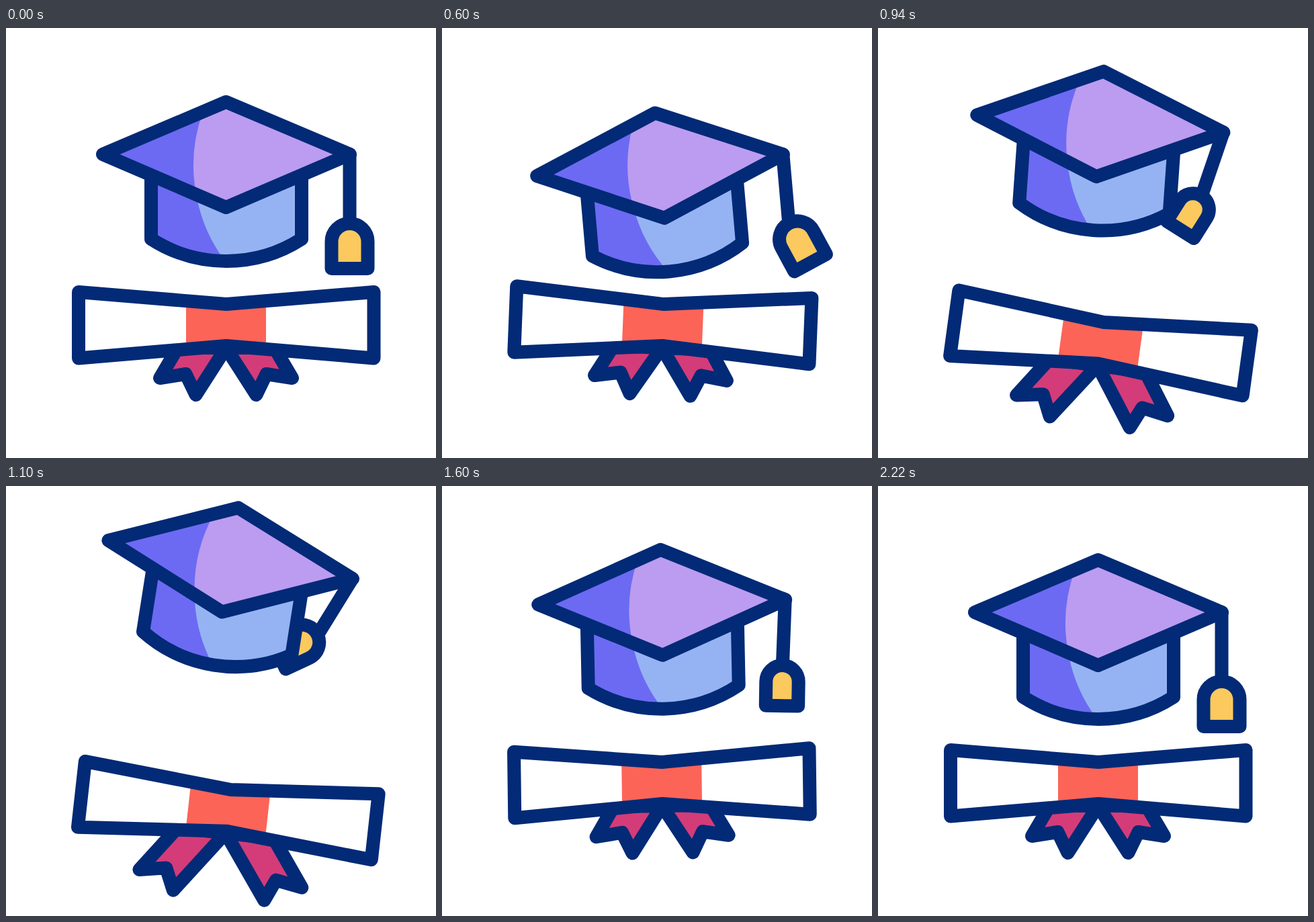
These frames come from a looping animation (640x640 px, 2400 ms). An HTML page without scripts:

```html
<!DOCTYPE html>
<html lang="en">
<head>
<meta charset="utf-8">
<title>Graduation cap and diploma</title>
<style>
  html, body { margin: 0; width: 100%; height: 100%; overflow: hidden; background: #fff; }
  svg { display: block; width: 100%; height: 100%; }

  .line { stroke: #032a76; stroke-width: 20; stroke-linejoin: round; stroke-linecap: round; fill: none; }
  .dark { fill: #6c6af3; }
  .lilac { fill: #bb9cf0; }
  .sky { fill: #95b3f3; }
  .gold { fill: #fbc95d; }
  .red { fill: #fc6458; }
  .pink { fill: #d33c79; }
  .paper { fill: #fff; }

  .cap, .string, .tag, .scroll, .ribbon {
    animation-duration: 2.4s;
    animation-iteration-count: infinite;
    animation-timing-function: cubic-bezier(.333, 0, .667, 1);
  }
  .cap { transform-origin: 327.5px 228px; animation-name: cap-jump, cap-tilt; }
  .string { transform-origin: 511.5px 188px; animation-name: string-swing; }
  .tag { transform-origin: 511.5px 291px; animation-name: tag-swing, tag-pull, tag-squash; }
  .scroll { transform-origin: 327.5px 470px; animation-name: scroll-drop, scroll-rock; }
  .ribbon { d: path("M0 6L-72 6L-98.5 51L-60 45L-45 76Z"); animation-name: ribbon-stretch; }

  @keyframes cap-jump {
    0%, 8.333%, 91.667%, 100% { translate: 0 0; }
    25% { translate: 0 16px; }
    50% { translate: 0 -86.5px; }
    75% { translate: 0 9.5px; }
  }
  @keyframes cap-tilt {
    0%, 8.333%, 91.667%, 100% { rotate: 0deg; }
    25%, 75% { rotate: -5deg; }
    50% { rotate: 10deg; }
  }
  @keyframes string-swing {
    0%, 25%, 91.667%, 100% { rotate: 0deg; }
    50% { rotate: 24.6deg; }
    75% { rotate: -4deg; }
  }
  @keyframes tag-swing {
    0%, 8.333%, 91.667%, 100% { rotate: 0deg; }
    25% { rotate: -23.4deg; }
    50% { rotate: 37.7deg; }
    75% { rotate: -14.8deg; }
  }
  @keyframes tag-pull {
    0%, 25%, 91.667%, 100% { translate: 0 0; }
    50%, 75% { translate: 0 -5px; }
  }
  /* The stroke keeps its weight while the tag shrinks. */
  @keyframes tag-squash {
    0%, 25%, 75%, 100% { d: path("M484.5 358L484.5 318C484.5 303 496.5 291 511.5 291C526.5 291 538.5 303 538.5 318L538.5 358Z"); }
    37.5% { d: path("M488.3 348.6L488.3 314.2C488.3 301.3 498.6 291 511.5 291C524.4 291 534.7 301.3 534.7 314.2L534.7 348.6Z"); animation-timing-function: ease-out; }
    50% { d: path("M485 356.7L485 317.5C485 302.8 496.8 291 511.5 291C526.2 291 538 302.8 538 317.5L538 356.7Z"); animation-timing-function: ease-in; }
    62.5% { d: path("M488.3 348.6L488.3 314.2C488.3 301.3 498.6 291 511.5 291C524.4 291 534.7 301.3 534.7 314.2L534.7 348.6Z"); }
  }
  @keyframes scroll-drop {
    0%, 25%, 66.667%, 100% { translate: 0 0; }
    50% { translate: 0 43.8px; }
  }
  @keyframes scroll-rock {
    0%, 8.333%, 91.667%, 100% { rotate: 0deg; }
    25% { rotate: 2.3deg; }
    41.667% { rotate: 8.1deg; }
    58.333% { rotate: -3deg; }
    75% { rotate: 1.5deg; }
  }
  @keyframes ribbon-stretch {
    0%, 25%, 66.667%, 100% { d: path("M0 6L-72 6L-98.5 51L-60 45L-45 76Z"); }
    50% { d: path("M0 6L-72 6L-123.5 76L-84 69L-70 101Z"); }
  }
</style>
</head>
<body>
<svg viewBox="0 0 640 640">
  <g class="scroll">
    <g transform="translate(327.5 470)">
      <path class="line pink ribbon" d="M0 6L-72 6L-98.5 51L-60 45L-45 76Z"/>
      <g transform="scale(-1 1)">
        <path class="line pink ribbon" d="M0 6L-72 6L-98.5 51L-60 45L-45 76Z"/>
      </g>
    </g>
    <path class="paper" d="M108 393L328 411 547.5 393V491.5L328 473 108 491.5Z"/>
    <path class="red" d="M268 408H387V476H268Z"/>
    <path class="line" d="M108 393L328 411 547.5 393V491.5L328 473 108 491.5Z"/>
  </g>

  <g class="cap">
    <g class="string">
      <path class="line" d="M511.5 188V288"/>
      <path class="line gold tag" d="M484.5 358L484.5 318C484.5 303 496.5 291 511.5 291C526.5 291 538.5 303 538.5 318L538.5 358Z"/>
    </g>
    <path class="dark" d="M216 220V314A207 207 0 0 0 440 314V220Z"/>
    <path class="sky" d="M283 247A232 232 0 0 0 326 347A207 207 0 0 0 440 314V220Z"/>
    <path class="line" d="M216 220V314A207 207 0 0 0 440 314V220"/>
    <path class="dark" d="M327.5 110L512 188 327.5 267 144 188Z"/>
    <path class="lilac" d="M293 125A232 232 0 0 0 283 247L327.5 267 512 188 327.5 110Z"/>
    <path class="line" d="M327.5 110L512 188 327.5 267 144 188Z"/>
  </g>
</svg>
</body>
</html>
```
